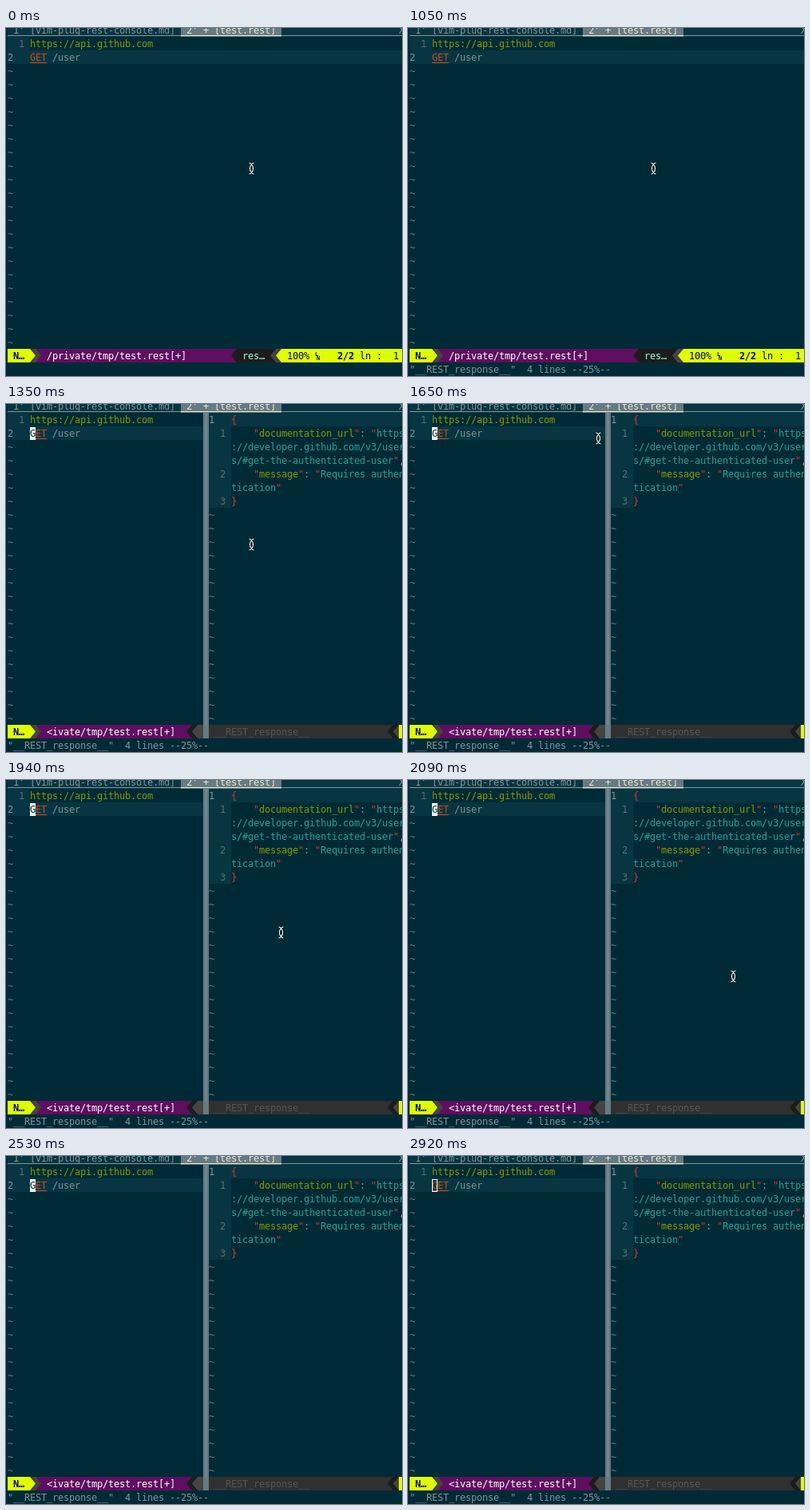
An HTML page with a canvas for the animation above (3.02 s loop, 496 by 436 pixels).

```html
<!DOCTYPE html>
<html lang="en">
<head>
<meta charset="utf-8">
<title>REST console</title>
<style>
html, body { margin: 0; width: 100%; height: 100%; overflow: hidden; background: #002b36; }
canvas { display: block; }
</style>
</head>
<body>
<canvas id="stage" width="496" height="436"></canvas>
<script>
const ctx = document.getElementById('stage').getContext('2d');
const LOOP = 3020, CELL = 7, ROW = 17, LEFT = 2, TOP = -6, WIDTH = 496;
const FONT = '"DejaVu Sans Mono", "Liberation Mono", monospace';
const C = {
  bg: '#002b36', line: '#073642', num: '#586e75', dim: '#657b83', text: '#839496',
  light: '#eee8d5', green: '#859900', orange: '#cb4b16', red: '#dc322f', cyan: '#2aa198',
  lime: '#dfff00', navy: '#00005f', grey: '#444444', purple: '#5f0f5f',
  black: '#1c1c1c', mint: '#9cffd3', idle: '#303030', idleText: '#565656'
};

// Pointer places as [start time, x, y]
const POINTER = [
  [0, 307.5, 176], [1650, 238.5, 43], [1790, 236.5, 46], [1940, 344.5, 191],
  [2090, 407.5, 246], [2240, 426.5, 271], [2390, 461, 436]
];
const POINTER_END = 2530;

const colX = col => LEFT + col * CELL;
const rowY = row => TOP + row * ROW;

function rect(x, y, w, h, color) {
  ctx.fillStyle = color;
  ctx.fillRect(x, y, w, h);
}

function cells(col, row, count, color, rows = 1) {
  rect(colX(col), rowY(row), count * CELL, rows * ROW, color);
}

function text(col, row, str, color, weight = 'normal') {
  ctx.font = `${weight} 12px ${FONT}`;
  ctx.fillStyle = color;
  [...str].forEach((ch, i) => {
    if (ch !== ' ') ctx.fillText(ch, colX(col + i), rowY(row) + 13);
  });
}

// Writes runs of [string, color] one after another
function runs(col, row, parts) {
  for (const [str, color] of parts) {
    text(col, row, str, color);
    col += str.length;
  }
}

function arrow(col, dir, color, back) {
  const x = colX(col), y = rowY(24);
  const base = dir > 0 ? x : x + CELL;
  cells(col, 24, 1, back);
  ctx.fillStyle = color;
  ctx.beginPath();
  ctx.moveTo(base, y);
  ctx.lineTo(base + dir * CELL, y + ROW / 2);
  ctx.lineTo(base, y + ROW);
  ctx.fill();
}

function tildes(col, from) {
  for (let row = from; row < 24; row++) text(col, row, '~', C.dim);
}

function tabs() {
  rect(LEFT, 0, WIDTH - LEFT, 11, C.line);
  cells(31, 0, 18, C.dim);
  text(1, 0, "1' [vim-plug-rest-console.md]", C.text);
  text(32, 0, "2' + [test.rest]", C.light);
  text(70, 0, 'X', C.text);
  rect(LEFT, 9, WIDTH - LEFT, 1, C.text);
  rect(colX(31), 9, 18 * CELL, 1, C.light);
}

function request(cols) {
  cells(0, 1, 4, C.line, 2);
  cells(4, 2, cols - 4, C.line);
  text(2, 1, '1', C.num);
  text(0, 2, '2', C.text);
  text(4, 1, 'https://api.github.com', C.green);
  text(4, 2, 'GET', C.orange);
  rect(colX(4), 43, 3 * CELL, 1, C.orange);
  text(8, 2, '/user', C.text);
  tildes(0, 3);
}

function response() {
  const quote = ['"', C.red];
  cells(36, 1, 4, C.line, 7);
  cells(40, 1, 31, C.line);
  text(36, 1, '1', C.text);
  [[2, '1'], [5, '2'], [7, '3']].forEach(([row, n]) => text(38, row, n, C.num));
  text(40, 1, '{', C.red);
  runs(44, 2, [quote, ['documentation_url', C.green], quote, [': ', C.text], quote, ['https', C.cyan]]);
  text(40, 3, '://developer.github.com/v3/user', C.cyan);
  runs(40, 4, [['s/#get-the-authenticated-user', C.cyan], quote, [',', C.text]]);
  runs(44, 5, [quote, ['message', C.green], quote, [': ', C.text], quote, ['Requires authen', C.cyan]]);
  runs(40, 6, [['tication', C.cyan], quote]);
  text(40, 7, '}', C.red);
  tildes(36, 8);
  rect(colX(35), 11, CELL, 408, C.dim);
  rect(colX(35) + 3, 11, 1, 391, C.text);
}

function mode() {
  cells(0, 24, 4, C.lime);
  text(1, 24, 'N…', C.navy, 'bold');
  arrow(4, 1, C.lime, C.grey);
  arrow(5, 1, C.grey, C.purple);
}

function wideStatus() {
  cells(6, 24, 34, C.purple);
  mode();
  text(7, 24, '/private/tmp/test.rest[+]', '#ffffff');
  arrow(40, -1, C.black, C.purple);
  cells(41, 24, 6, C.black);
  text(42, 24, 'res…', C.mint);
  arrow(47, -1, C.grey, C.black);
  arrow(48, -1, C.lime, C.grey);
  cells(49, 24, 22, C.lime);
  text(50, 24, '100%', C.navy);
  ctx.font = `bold 7px ${FONT}`;
  ctx.fillText('L', colX(55), rowY(24) + 9);
  ctx.fillText('N', colX(55) + 2, rowY(24) + 14);
  text(59, 24, '2/2', C.navy, 'bold');
  text(63, 24, 'ln :  1', C.navy);
}

function splitStatus() {
  cells(6, 24, 26, C.purple);
  mode();
  text(7, 24, '<ivate/tmp/test.rest[+]', '#ffffff');
  arrow(32, -1, C.black, C.purple);
  arrow(33, -1, C.grey, C.black);
  cells(34, 24, 1, C.grey);
  cells(36, 24, 32, C.idle);
  text(37, 24, '__REST_response__', C.idleText);
  arrow(68, -1, C.black, C.idle);
  arrow(69, -1, C.grey, C.black);
  cells(70, 24, 1, C.lime);
}

function message(t) {
  if (t < 1050) return;
  text(0, 25, '"__REST_response__"  4 lines --25%--', C.text);
  if (t >= 1200 && t < 1350) {
    cells(0, 25, 1, C.text);
    text(0, 25, '"', C.bg);
  }
}

function cursor(t) {
  const x = colX(4), y = 29;
  if (t < 2920) {
    rect(x, y, CELL, 16, '#ffffff');
    text(4, 2, 'G', C.bg);
  } else {
    ctx.strokeStyle = '#ffffff';
    ctx.lineWidth = 1;
    ctx.strokeRect(x + 0.5, y + 0.5, CELL - 1, 15);
  }
}

function beam() {
  ctx.beginPath();
  for (const s of [-1, 1]) {
    ctx.moveTo(-3, 7 * s);
    ctx.quadraticCurveTo(0, 6.5 * s, 0, 4 * s);
    ctx.quadraticCurveTo(0, 6.5 * s, 3, 7 * s);
  }
  ctx.moveTo(2, 0);
  ctx.ellipse(0, 0, 2, 4, 0, 0, Math.PI * 2);
  ctx.stroke();
}

function pointer(t) {
  if (t >= POINTER_END) return;
  const [, x, y] = POINTER.filter(p => p[0] <= t).pop();
  ctx.save();
  ctx.translate(x, y);
  for (const [color, width] of [['#001a22', 2.4], ['#ffffff', 1.1]]) {
    ctx.strokeStyle = color;
    ctx.lineWidth = width;
    beam();
  }
  rect(-0.5, -3, 1, 6, '#001a22');
  ctx.restore();
}

function draw(t) {
  const split = t >= 1350;
  rect(0, 0, WIDTH, 436, C.bg);
  tabs();
  request(split ? 35 : 71);
  if (split) {
    response();
    splitStatus();
    cursor(t);
  } else {
    wideStatus();
  }
  message(t);
  pointer(t);
}

const start = performance.now();
function tick() {
  draw((performance.now() - start) % LOOP);
  requestAnimationFrame(tick);
}
tick();
</script>
</body>
</html>
```
